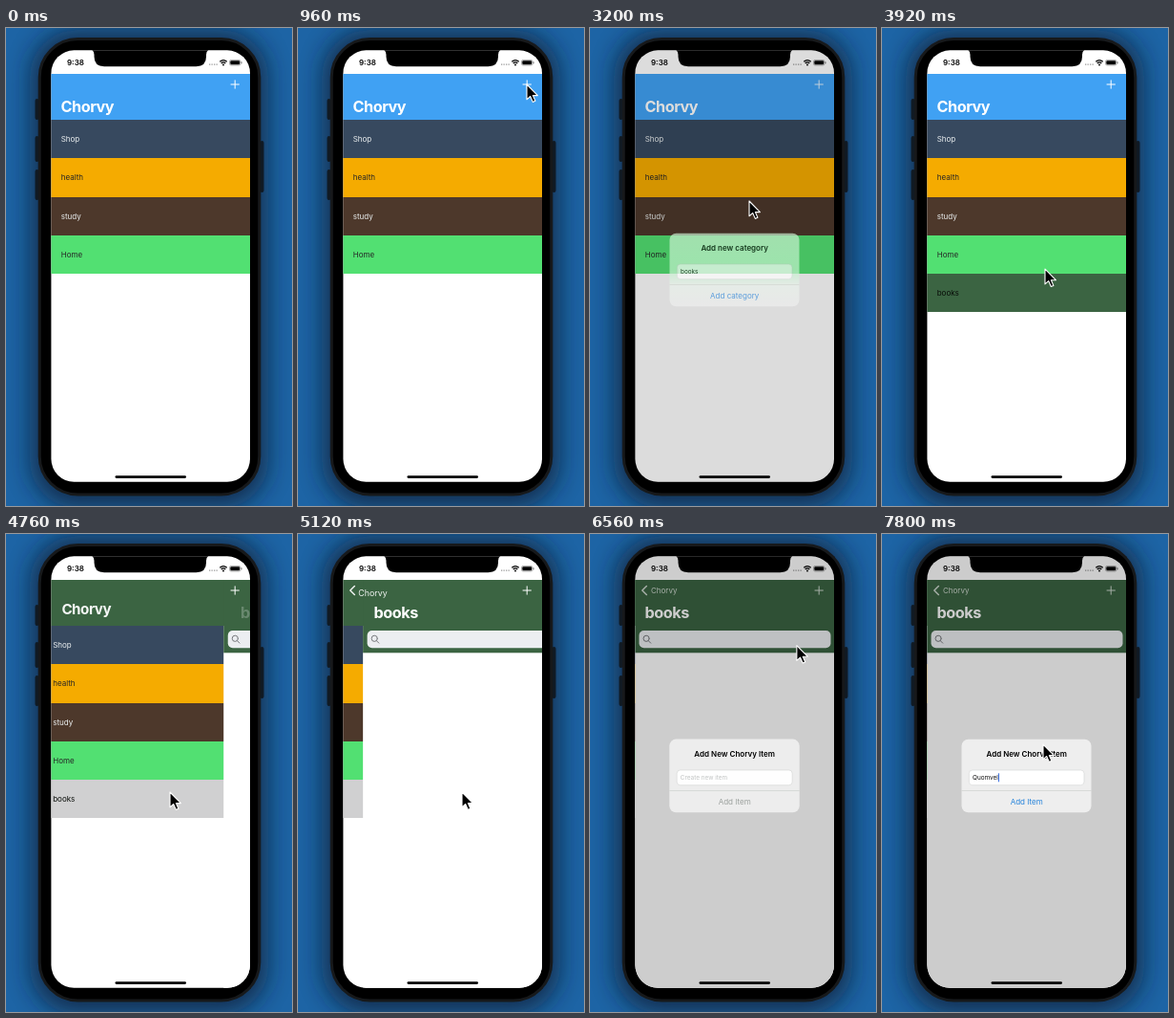
An HTML page for the animation above (8 s loop, 300 by 500 pixels).

```html
<!DOCTYPE html>
<html lang="en">
<head>
<meta charset="utf-8">
<title>Category list demo</title>
<style>
  html, body { margin: 0; width: 100%; height: 100%; overflow: hidden; background: #1d64a5; }
  svg { display: block; width: 100vw; height: 100vh; }
  text { font-family: Inter, "Liberation Sans", sans-serif; font-size: 8px; white-space: pre; }
  .large { font-size: 16.3px; font-weight: 700; letter-spacing: -.5px; fill: #fff; }
  .heading { font-weight: 600; text-anchor: middle; }
  .action { text-anchor: middle; }
  .entry { font-size: 6.4px; }
  .line { fill: none; stroke: #fff; stroke-linecap: round; stroke-linejoin: round; }
</style>
</head>
<body>
<svg viewBox="0 0 300 500" preserveAspectRatio="none">
  <defs>
    <clipPath id="screen"><rect x="47.400" y="23.300" width="208.600" height="451.500" rx="24"/></clipPath>
    <filter id="blur" x="-30%" y="-20%" width="160%" height="140%"><feGaussianBlur stdDeviation="12"/></filter>
    <linearGradient id="tinted" x1="0" y1="0" x2="0" y2="1">
      <stop offset="0" stop-color="#c8efcf"/>
      <stop offset=".5" stop-color="#c3f3cd"/>
      <stop offset=".72" stop-color="#eaf3ec"/>
      <stop offset="1" stop-color="#efefef"/>
    </linearGradient>
  </defs>

  <rect width="300" height="500" fill="#1d64a5"/>
  <rect x="25" y="2" width="250" height="500" rx="48" fill="#071a2e" opacity=".68" filter="url(#blur)"/>
  <path d="M32.500 76v18M32.500 115v23M32.500 150v28M268.500 120v50" stroke="#101a24" stroke-width="4" stroke-linecap="round"/>
  <rect x="35.200" y="11.500" width="230.600" height="476.500" rx="40" fill="#000" stroke="#17191b" stroke-width="3"/>

  <g clip-path="url(#screen)">
    <rect x="47" y="23" width="210" height="453" fill="#fff"/>
    <g id="list"></g>
    <rect id="header" x="47" y="48" width="210" height="48"/>
    <g id="detail">
      <rect x="47" y="96" width="210" height="380" fill="#fff"/>
      <rect x="47" y="48" width="210" height="76.300" fill="#3b6442"/>
      <rect x="51.500" y="101" width="201" height="18.300" rx="5" fill="#eceef1"/>
      <path d="M62.200 109.300a3.100 3.100 0 1 1-6.200 0a3.100 3.100 0 1 1 6.200 0M61.300 111.700l2.400 2.400" class="line" style="stroke:#77797d"/>
    </g>
    <text id="detailTitle" class="large" y="88">books</text>
    <text id="title" class="large">Chorvy</text>
    <g id="tint">
      <g id="back">
        <path class="line" stroke-width="1.500" d="M59.300 54.500l-4.500 4.500l4.500 4.500"/>
        <text id="backLabel" fill="#fff">Chorvy</text>
      </g>
      <path class="line" d="M236 59h8.400M240.200 54.800v8.400"/>
    </g>
    <g>
      <text x="64" y="39" style="font-weight:600">9:38</text>
      <path d="M213 38.200h9" stroke="#999" stroke-width="1.300" stroke-dasharray="1.300 1.200"/>
      <path d="M224.300 35.300q3.700-3.400 7.400 0M225.700 36.900q2.300-2 4.600 0" fill="none" stroke="#000" stroke-width="1.300"/>
      <circle cx="228" cy="38.500" r="1"/>
      <rect x="234.500" y="33.500" width="11.500" height="5.500" rx="1.600" fill="none" stroke="#777" stroke-width=".6"/>
      <rect x="235.300" y="34.300" width="9.900" height="3.900" rx="1"/>
      <path d="M247 35.300v2" stroke="#777"/>
    </g>
    <rect x="114.500" y="468.300" width="74.500" height="2.600" rx="1.300"/>
    <rect id="dim" x="47" y="23" width="210" height="453"/>
    <path d="M87 22Q92.500 22.500 92.500 28V30Q92.500 40.200 103 40.200H199.500Q210 40.200 210 30V28Q210 22.500 215.500 22Z"/>
    <g id="dialogs"></g>
  </g>
  <path id="cursor" d="M0 0V15.800L3.700 12.500L6.300 18.400L8.900 17.300L6.400 11.600H11.400Z" stroke="#fff" stroke-width="1.100" stroke-linejoin="round"/>
</svg>

<script>
const LOOP = 8000;
const $ = id => document.getElementById(id);
const clamp = v => Math.max(0, Math.min(1, v));
const mix = (a, b, p) => a + (b - a) * p;
const smooth = u => u * u * (3 - 2 * u);
const easeOut = u => 1 - (1 - u) ** 3;
const ramp = (t, start, length) => clamp((t - start) / length);
const set = (el, attrs) => { for (const k in attrs) el.setAttribute(k, attrs[k]); };

const rowTop = i => Math.round(96 + 40.25 * i);
const PUSH = 4690, ROW_ADDED = 3480, ROW_PRESSED = 4440;

const rows = [
  ['Shop', '#37495f', '#ecf0f1'],
  ['health', '#f5ab00', '#262626'],
  ['study', '#4d382b', '#ecf0f1'],
  ['Home', '#52e072', '#262626'],
  ['books', '#3b6442', '#080c08'],
];
$('list').innerHTML = rows.map(([name, fill, ink], i) => `<g>
  <rect x="47" y="${rowTop(i)}" width="210" height="${rowTop(i + 1) - rowTop(i)}" fill="${fill}"/>
  <text x="57.700" y="${rowTop(i) + 23.300}" fill="${ink}">${name}</text></g>`).join('');
const newRow = $('list').lastElementChild;

const dialogs = [
  { heading: 'Add new category', hint: 'Create new category', action: 'Add category', fill: 'url(#tinted)',
    open: 1220, close: 3100, word: 'books', typed: t => Math.floor((t - 1830) / 130),
    caret: t => t < 2900 ? ramp(t, 1500, 80) : 1 - ramp(t, 2900, 80) },
  { heading: 'Add New Chorvy Item', hint: 'Create new item', action: 'Add Item', fill: '#eeeeee',
    open: 6260, close: Infinity, word: 'Quomvel', typed: t => t >= 7800 ? 7 : 0,
    caret: t => t < 7800 ? ramp(t, 6680, 80) - ramp(t, 7260, 100) : 1 },
];

for (const d of dialogs) {
  const g = document.createElementNS('http://www.w3.org/2000/svg', 'g');
  g.innerHTML = `<rect x="83.500" y="214.700" width="136" height="76.500" rx="7" fill="${d.fill}"/>
    <text class="heading" x="151.700" y="233">${d.heading}</text>
    <rect x="91.300" y="247" width="120.700" height="15.700" rx="3.500" fill="#fff" stroke="#d2d4d3" stroke-width=".6"/>
    <text class="entry" x="95" y="257.400"></text>
    <rect y="250.300" width="1" height="9" fill="#3a6fe0"/>
    <path d="M83.500 268.500h136" stroke="#c9cdca" stroke-width=".6"/>
    <text class="action" x="151.700" y="283">${d.action}</text>`;
  $('dialogs').append(g);
  d.group = g;
  [d.entry, d.button] = g.querySelectorAll('.entry, .action');
  d.caretBar = d.entry.nextElementSibling;
}

// Each move: start, end, from, to
const moves = [
  [400, 900, [196, 150], [240, 59]],
  [1080, 1400, [240, 59], [179.5, 152.5]],
  [1400, 1640, [179.5, 152.5], [167, 181]],
  [3380, 4140, [167, 181], [172, 270]],
  [5260, 5960, [172, 270], [244, 58]],
  [6260, 7000, [244, 58], [169, 220]],
];

function drawCursor(t) {
  const [start, end, from, to] = moves.findLast(m => t >= m[0]) || moves[0];
  const p = smooth(ramp(t, start, end - start));
  set($('cursor'), {
    transform: `translate(${mix(from[0], to[0], p)} ${mix(from[1], to[1], p)})`,
    opacity: t < moves[0][0] ? 0 : 1,
  });
}

function drawDialog(d, t) {
  const shown = easeOut(ramp(t, d.open, 400));
  const alpha = shown * (1 - ramp(t, d.close, 330));
  const scale = 1.2 - .2 * shown;
  set(d.group, {
    opacity: alpha,
    transform: `translate(151.500 253) scale(${scale}) translate(-151.500 -253)`,
  });
  const text = d.word.slice(0, Math.max(0, d.typed(t)));
  d.entry.textContent = text || d.hint;
  set(d.entry, { fill: text ? '#111' : '#c3c6c5' });
  set(d.button, { fill: text ? '#2583db' : '#9ba09d' });
  set(d.caretBar, { x: text ? 95.2 + d.entry.getComputedTextLength() : 95, opacity: d.caret(t) });
  return alpha;
}

function drawPush(t) {
  const w = Math.max(0, t - PUSH) * .009;
  const p = t > PUSH + 1000 ? 1 : 1 - (1 + w) * Math.exp(-w);
  const pushing = t >= PUSH;
  set($('list'), { transform: `translate(${-63 * p} 0)` });
  set($('header'), { fill: pushing ? '#3b6442' : '#40a1f3' });
  set($('detail'), { transform: `translate(${209.5 * (1 - p)} 0)`, opacity: pushing ? 1 : 0 });
  set($('detailTitle'), { x: 57.5 + 218 * (1 - p), opacity: pushing ? clamp(.1 + p) : 0 });

  const x = mix(57.5, 64, p), y = mix(88, 62, p);
  const place = scale => `translate(${x} ${y}) scale(${scale})`;
  set($('title'), { transform: place(mix(1, .49, p)), opacity: 1 - clamp((p - .1) * 1.4) });
  set($('backLabel'), { transform: place(mix(2.04, 1, p)) });
  set($('back'), { opacity: clamp((p - .3) / .65) });
}

function draw(t) {
  set(newRow, { opacity: t >= ROW_ADDED ? 1 : 0 });
  set(newRow.firstElementChild, { fill: t >= ROW_PRESSED ? '#d0d0d1' : rows[4][1] });
  drawPush(t);
  const dim = Math.max(...dialogs.map(d => drawDialog(d, t)));
  set($('dim'), { opacity: .2 * dim });
  set($('tint'), { opacity: 1 - .25 * dim });
  drawCursor(t);
}

const began = performance.now();
function tick() {
  draw((performance.now() - began) % LOOP);
  requestAnimationFrame(tick);
}
tick();
</script>
</body>
</html>
```
